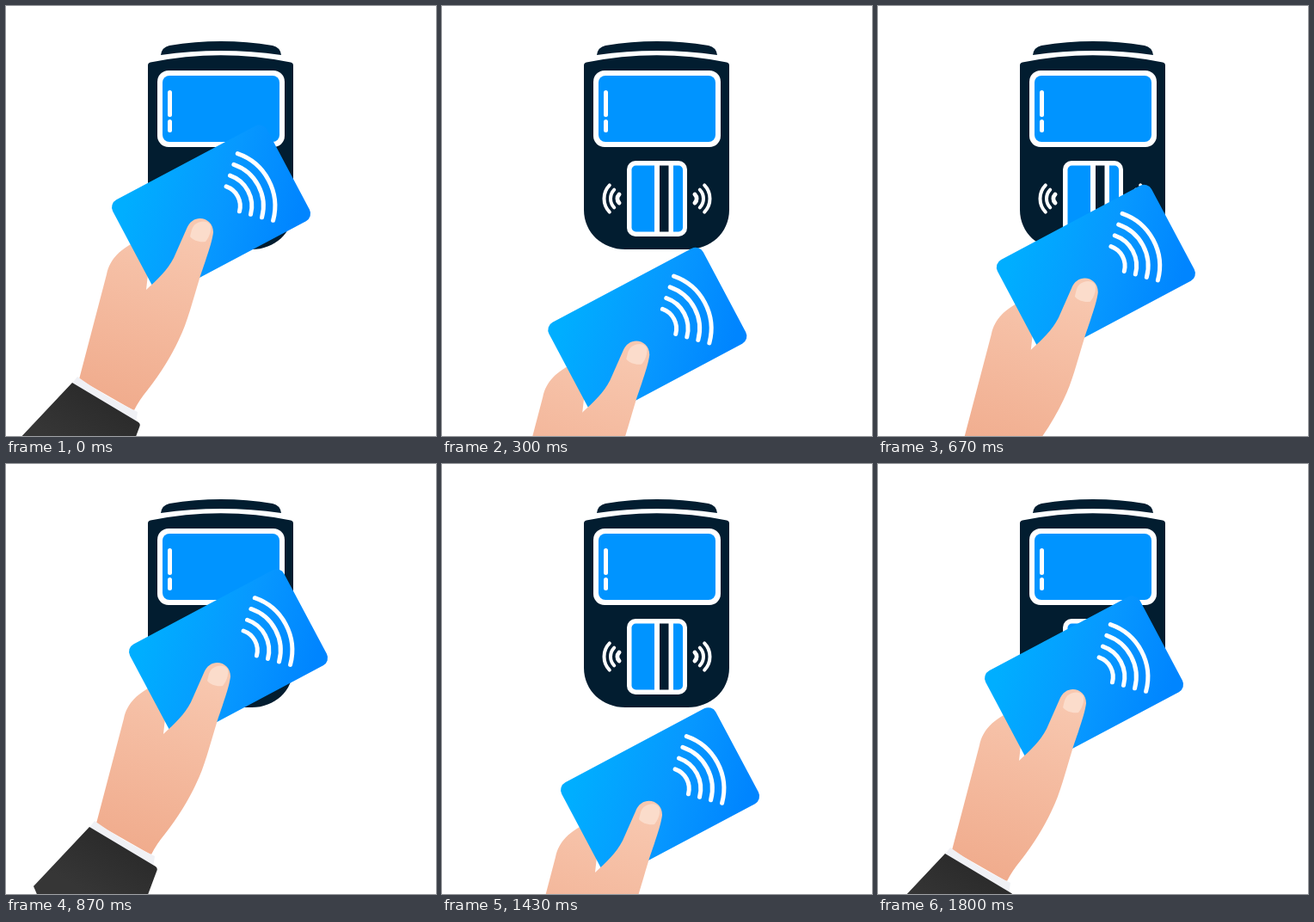
An HTML page for the animation above (2010 ms loop, 500 by 500 pixels).

```html
<!DOCTYPE html>
<html lang="en">
<head>
<meta charset="utf-8">
<title>Contactless payment</title>
<style>
  html, body { margin: 0; width: 100%; height: 100%; overflow: hidden; background: #fff; }
  svg { display: block; width: 100vw; height: 100vh; }
  .navy { fill: #021d30; }
  .blue { fill: #0094ff; }
  .white { fill: #fff; }
  .wave { fill: none; stroke: #fff; stroke-linecap: round; }
</style>
</head>
<body>
<svg viewBox="0 0 500 500">
  <defs>
    <linearGradient id="cardFill" x1="0" y1="0.2" x2="1" y2="0.8">
      <stop offset="0" stop-color="#00aeff"/>
      <stop offset="0.55" stop-color="#0798ff"/>
      <stop offset="1" stop-color="#0085ff"/>
    </linearGradient>
    <linearGradient id="skin" gradientUnits="userSpaceOnUse" x1="200" y1="250" x2="130" y2="470">
      <stop offset="0" stop-color="#f8c8b0"/>
      <stop offset="1" stop-color="#f0ab8c"/>
    </linearGradient>
    <linearGradient id="cloth" gradientUnits="userSpaceOnUse" x1="110" y1="455" x2="75" y2="515">
      <stop offset="0" stop-color="#2b2b2b"/>
      <stop offset="1" stop-color="#363636"/>
    </linearGradient>
  </defs>

  <!-- terminal -->
  <path class="navy" d="M180 57 Q181 48 190 46 Q250 36 310 46 Q319 48 320 57 Q250 47 180 57Z"/>
  <path class="navy" d="M165 69 Q165 66 168 65.500 Q250 49 331 65.500 Q334 66 334 69 V237 C334 264 312 283 286 283 H213 C187 283 165 264 165 237Z"/>
  <rect class="white" x="176" y="75" width="148" height="89" rx="13"/>
  <rect class="blue" x="182" y="81" width="136" height="77" rx="8"/>
  <rect class="white" x="188" y="98" width="5" height="31" rx="2.500"/>
  <rect class="white" x="188" y="132" width="5" height="15" rx="2.500"/>
  <rect class="white" x="215" y="180" width="70" height="88" rx="10"/>
  <rect class="blue" x="220.500" y="185.500" width="59.500" height="77" rx="5"/>
  <rect class="white" x="247" y="185" width="22" height="78"/>
  <rect class="navy" x="253" y="185.500" width="10.500" height="77"/>
  <g id="readerWaves"></g>

  <!-- hand holding the card -->
  <g id="hand">
    <path fill="url(#skin)" d="M156 271 C132 283 121 294 117 312 L85 434 L148 470 L175 400 L163 330 L165 312 L175 290Z"/>
    <rect fill="url(#cardFill)" width="203" height="125.500" rx="10" transform="translate(119.500 230) rotate(-28)"/>
    <g id="cardWaves"></g>
    <path fill="url(#skin)" d="M163 330 C176 318 188 307 195 293 L210 259 C217 240 241 245 241 263 C240 274 232 296 225 317 C217 343 211 368 201 388 C192 407 180 427 165 446 Q155 458 149 470 L110 440 L140 370Z"/>
    <path fill="#fbdccb" d="M216 260 C219 250 233 247 238 255 C239 262 236 269 232 274 C225 275 218 273 214 268Z"/>
    <path fill="#f0f1f5" d="M83 431 Q116 455 153 472 L151 486 L76 440Z"/>
    <path fill="url(#cloth)" d="M77 438 L154 484 Q157 486 155 490 L140 530 H22 L12 507Z"/>
  </g>
</svg>
<script>
const SVG = "http://www.w3.org/2000/svg";

// One arc centred on the axis `dir`, spreading `half` degrees to each side.
function addArc(parent, cx, cy, r, dir, half, width) {
  const point = deg => {
    const a = deg * Math.PI / 180;
    return `${cx + r * Math.cos(a)} ${cy + r * Math.sin(a)}`;
  };
  const arc = document.createElementNS(SVG, "path");
  arc.setAttribute("class", "wave");
  arc.setAttribute("stroke-width", width);
  arc.setAttribute("d", `M${point(dir - half)} A${r} ${r} 0 0 1 ${point(dir + half)}`);
  parent.append(arc);
}

const readerWaves = document.getElementById("readerWaves");
for (const [r, width] of [[22.5, 4], [15, 4], [7, 5]]) {
  addArc(readerWaves, 211, 224, r, 180, 44, width);
  addArc(readerWaves, 289, 224, r, 0, 44, width);
}
const cardWaves = document.getElementById("cardWaves");
for (const r of [24, 37.5, 51, 64.5]) addArc(cardWaves, 248.3, 232.6, r, -28, 43, 5);

// Hand offset: time in ms, x, y
const keys = [
  [0, 0, 0], [90, -2, 47], [170, -3, 101], [260, -1, 135], [350, 2, 146],
  [470, 6, 138], [533, 10, 123], [640, 14, 82], [750, 17, 29], [867, 20, -16],
  [910, 22, -20], [960, 23.5, 0], [1067, 18, 64], [1133, 15, 108], [1220, 13.5, 142],
  [1320, 13.5, 153], [1433, 15, 145], [1530, 14.5, 113], [1600, 12.5, 82],
  [1700, 7.5, 44], [1800, 1, 15]
];

function slope(i, c) {
  const a = keys[Math.max(i - 1, 0)], b = keys[Math.min(i + 1, keys.length - 1)];
  return (b[c] - a[c]) / (b[0] - a[0]);
}

// Cubic Hermite curve through the keys
function offset(t, c) {
  let i = 0;
  while (i < keys.length - 2 && t >= keys[i + 1][0]) i++;
  const a = keys[i], b = keys[i + 1], d = b[0] - a[0], u = (t - a[0]) / d, v = 1 - u;
  return v * v * ((1 + 2 * u) * a[c] + u * d * slope(i, c))
       + u * u * ((3 - 2 * u) * b[c] - v * d * slope(i + 1, c));
}

const LOOP = 2010, LAST_STEP = 54;
const hand = document.getElementById("hand");
const start = performance.now();

function draw(now) {
  const t = Math.max(0, now - start) % LOOP, rest = t % 100;
  // Thirty steps a second, then a hold on the last pose
  const step = Math.min(LAST_STEP, 3 * Math.floor(t / 100) + (rest >= 30) + (rest >= 70));
  const time = step * 100 / 3;
  hand.setAttribute("transform", `translate(${offset(time, 1)} ${offset(time, 2)})`);
  requestAnimationFrame(draw);
}
draw(start);
</script>
</body>
</html>
```
